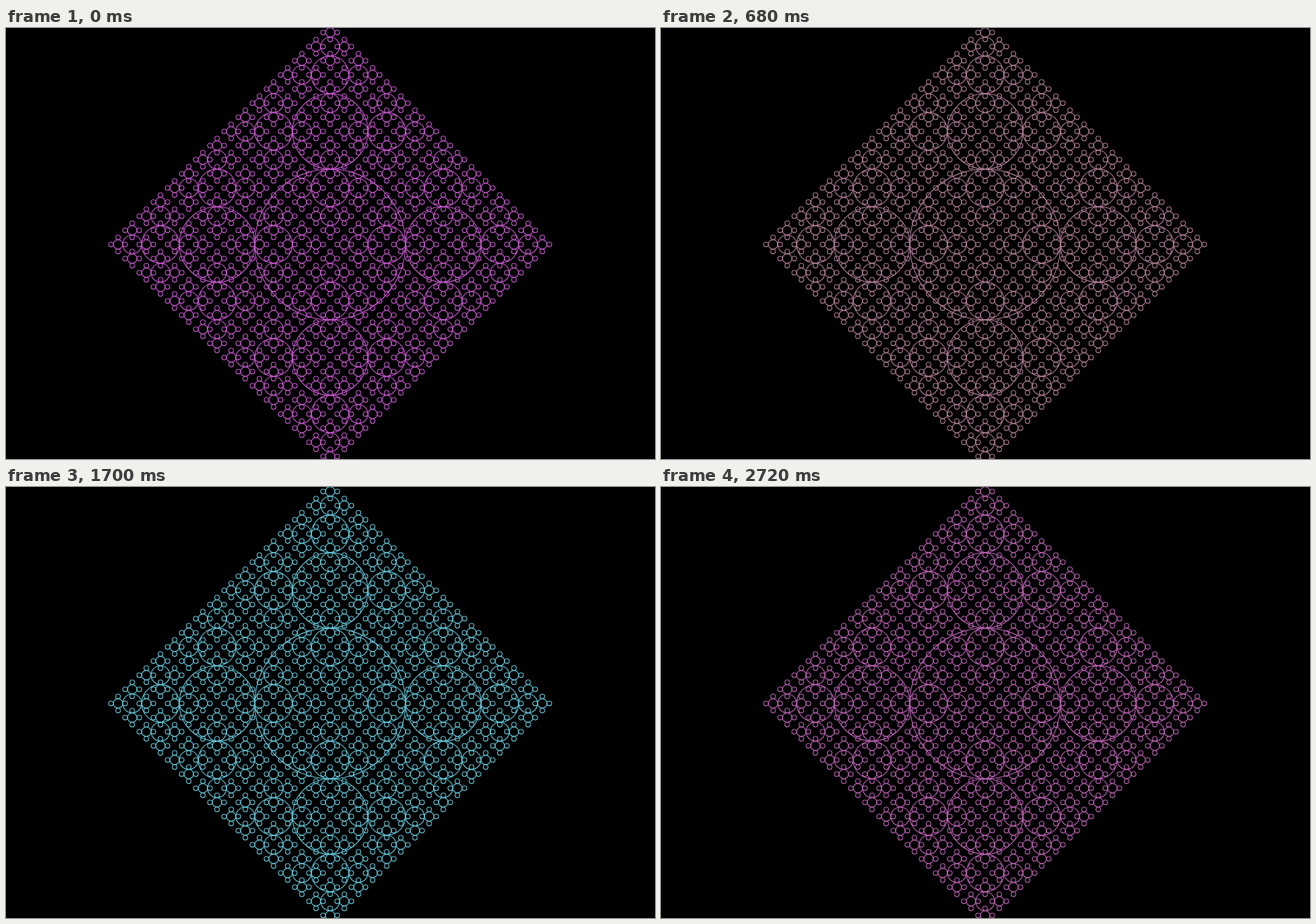
Write an HTML page with a canvas that moves like this. It is 918 px wide and 610 px high and loops after 3.04 s.

```html
<!DOCTYPE html>
<html lang="en">
<head>
<meta charset="utf-8">
<title>Circle fractal</title>
<style>
html, body { margin: 0; width: 100%; height: 100%; overflow: hidden; background: #000; }
canvas { display: block; }
</style>
</head>
<body>
<canvas id="stage" width="918" height="610"></canvas>
<script>
const ctx = document.getElementById('stage').getContext('2d');
const LOOP = 3040;

// [start in ms, stroke colour]
const steps = [
  [0, '#bf55c6'],
  [70, '#c65fb0'],
  [380, '#cb6594'],
  [680, '#a87890'],
  [1000, '#76878c'],
  [1400, '#80d0c0'],
  [1700, '#62c0d2'],
  [2020, '#41b0e0'],
  [2340, '#7d48ec'],
  [2720, '#b45fac']
];

function circles(x, y, r) {
  ctx.beginPath();
  ctx.arc(x, y, r, 0, Math.PI * 2);
  ctx.stroke();
  if (r < 4) return;
  const d = r * 1.5;
  circles(x + d, y, r / 2);
  circles(x - d, y, r / 2);
  circles(x, y + d, r / 2);
  circles(x, y - d, r / 2);
}

function draw(color) {
  ctx.fillStyle = '#000';
  ctx.fillRect(0, 0, 918, 610);
  ctx.strokeStyle = color;
  ctx.lineWidth = 1.15;
  circles(458.5, 306.3, 320 / 3);
}

let shown = null;
function tick() {
  const t = performance.now() % LOOP;
  const step = steps.findLast(s => s[0] <= t);
  if (step !== shown) {
    shown = step;
    draw(step[1]);
  }
  requestAnimationFrame(tick);
}
tick();
</script>
</body>
</html>
```
